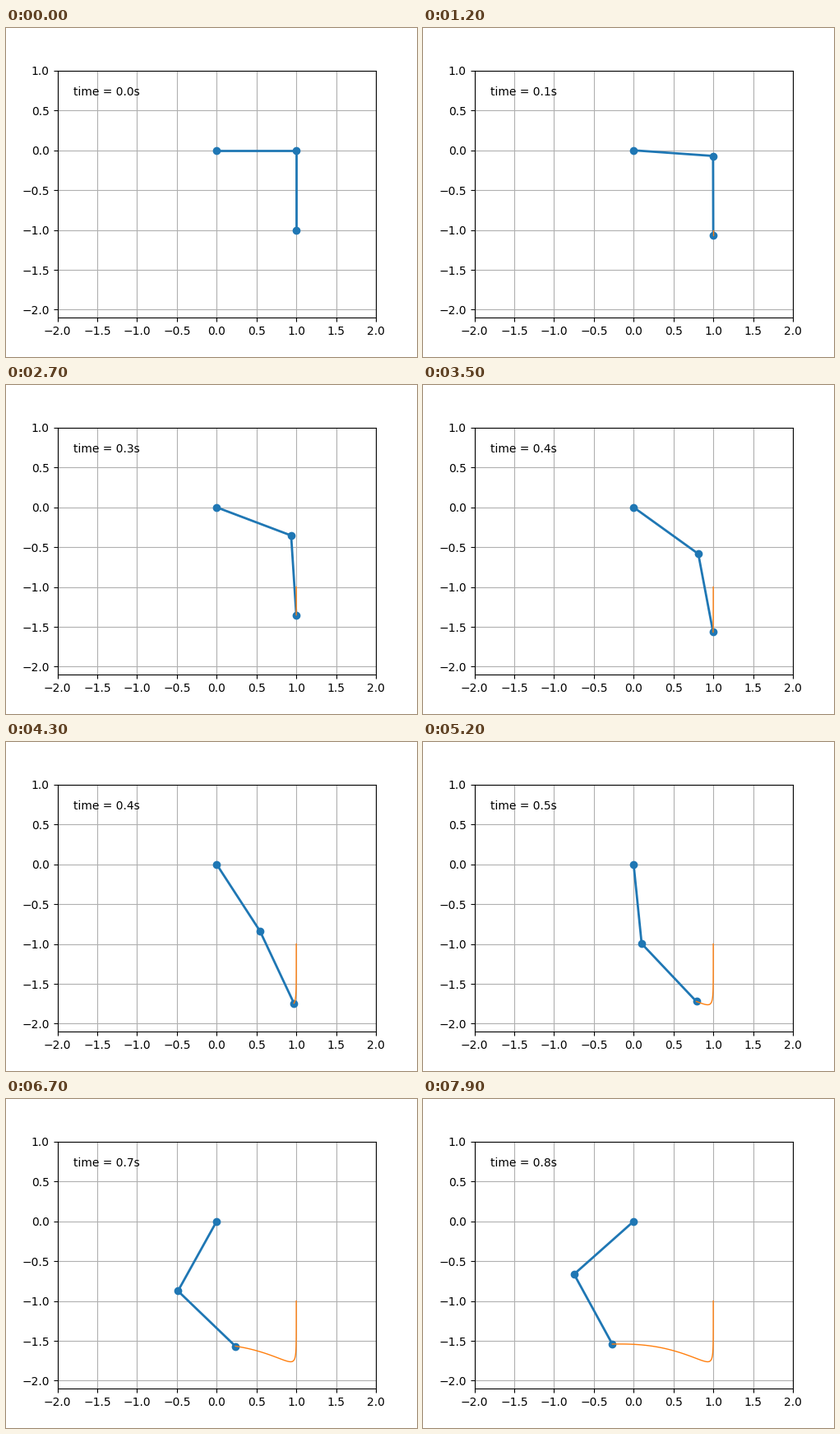
Write a matplotlib script that moves like this. It is 500 by 400 pixels and loops after 8000 ms.

```python
import numpy as np
import matplotlib.pyplot as plt
from matplotlib.animation import FuncAnimation

G = 9.8
L1 = L2 = 1.0
M1 = M2 = 1.0
DT = 0.01
FRAMES = 80
SUBSTEPS = 10


def derivs(s):
    th1, w1, th2, w2 = s
    d = th2 - th1
    sin, cos = np.sin(d), np.cos(d)
    total = M1 + M2
    den1 = total * L1 - M2 * L1 * cos**2
    a1 = (M2 * L1 * w1**2 * sin * cos
          + M2 * G * np.sin(th2) * cos
          + M2 * L2 * w2**2 * sin
          - total * G * np.sin(th1)) / den1
    den2 = den1 * L2 / L1
    a2 = (-M2 * L2 * w2**2 * sin * cos
          + total * (G * np.sin(th1) * cos
                     - L1 * w1**2 * sin
                     - G * np.sin(th2))) / den2
    return np.array([w1, a1, w2, a2])


def rk4(s, h):
    k1 = derivs(s)
    k2 = derivs(s + h / 2 * k1)
    k3 = derivs(s + h / 2 * k2)
    k4 = derivs(s + h * k3)
    return s + h / 6 * (k1 + 2 * k2 + 2 * k3 + k4)


def simulate(state):
    states = [state]
    for _ in range(FRAMES - 1):
        for _ in range(SUBSTEPS):
            state = rk4(state, DT / SUBSTEPS)
        states.append(state)
    return np.array(states)


states = simulate(np.array([np.pi / 2, 0.0, 0.0, 0.0]))
th1, th2 = states[:, 0], states[:, 2]
x1, y1 = L1 * np.sin(th1), -L1 * np.cos(th1)
x2, y2 = x1 + L2 * np.sin(th2), y1 - L2 * np.cos(th2)

fig = plt.figure(figsize=(5, 4), dpi=100)
ax = fig.add_subplot(xlim=(-2, 2), ylim=(-2.1, 1))
ax.set_aspect("equal")
ax.grid()

rods, = ax.plot([], [], "o-", lw=2)
trace, = ax.plot([], [], "-", lw=1)
label = ax.text(0.05, 0.9, "", transform=ax.transAxes)


def update(i):
    rods.set_data([0, x1[i], x2[i]], [0, y1[i], y2[i]])
    trace.set_data(x2[:i + 1], y2[:i + 1])
    label.set_text(f"time = {i * DT:.1f}s")
    return rods, trace, label


anim = FuncAnimation(fig, update, frames=FRAMES, interval=100)
plt.show()
```
